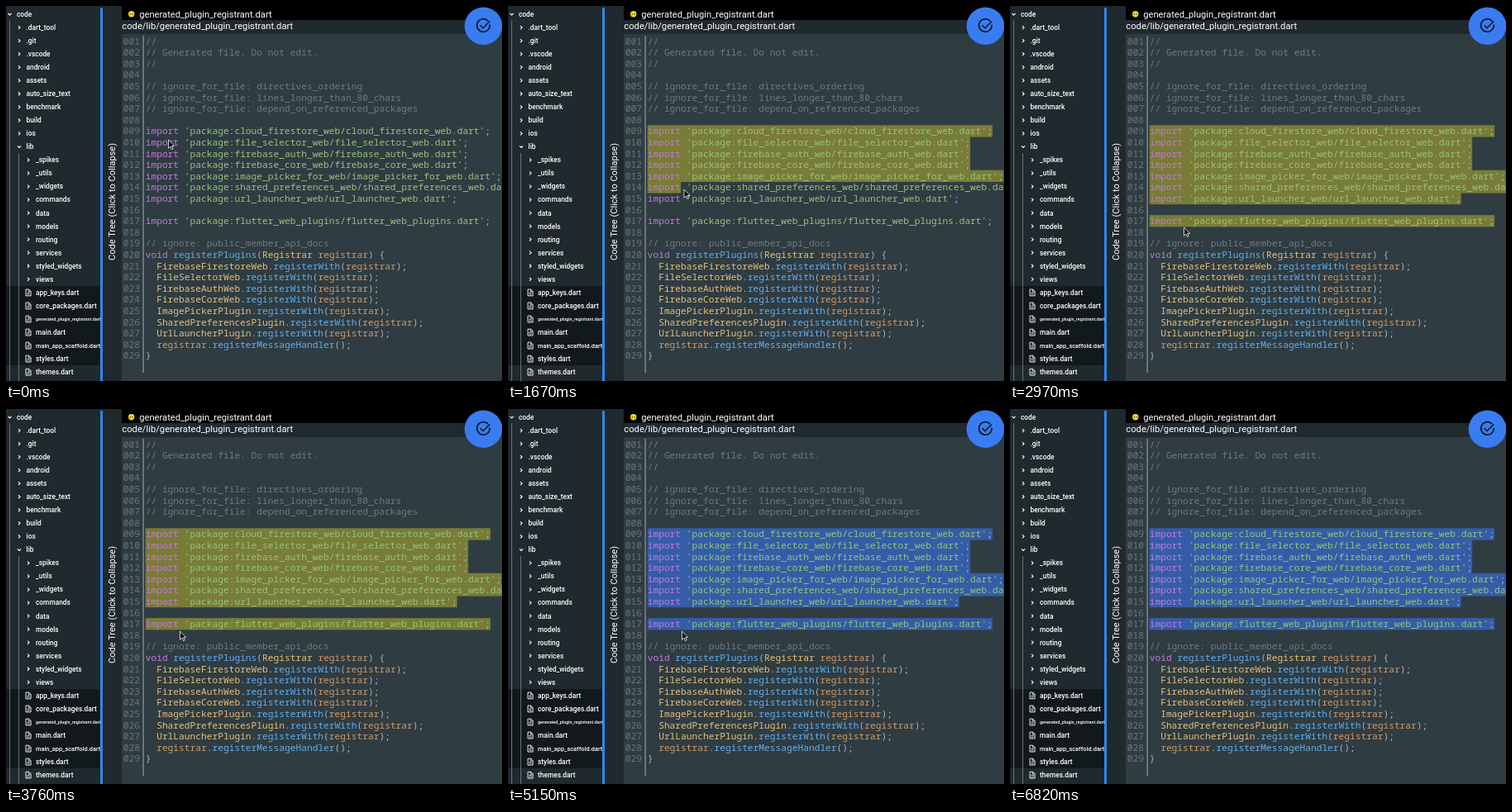
Write an HTML page that moves like this. It is 600 px wide and 454 px high and loops after 6.85 s.

```html
<!DOCTYPE html>
<html>
<head>
<meta charset="utf-8">
<style>
html, body { margin: 0; width: 100%; height: 100%; overflow: hidden; background: #000; }
svg { display: block; }
text { white-space: pre; font-family: Roboto, sans-serif; fill: #fff; }
.mono { font: 11.22px "Noto Sans Mono", "DejaVu Sans Mono", monospace; }
</style>
</head>
<body>
<svg id="stage" width="600" height="454" viewBox="0 0 600 454"></svg>
<script>
const stage = document.getElementById('stage');
const LOOP = 6850, LAG = 80, DRAG_START = 850, RECOLOR = 4000, CURSOR_END = 6000;
const CODE_X = 168.7, CODE_Y = 35.8, CHAR = 6.732, LINE = 13.6, FIRST = 8, LAST = 16;
const PANEL = '#20292e';

function add(tag, attrs, content, parent = stage) {
  const el = document.createElementNS('http://www.w3.org/2000/svg', tag);
  for (const key in attrs) el.setAttribute(key, attrs[key]);
  if (content) el.textContent = content;
  return parent.appendChild(el);
}
const rect = (x, y, width, height, fill) => add('rect', { x, y, width, height, fill });
const label = (x, y, size, content, extra) =>
  add('text', { x, y, 'font-size': size, ...extra }, content);
const path = (d, stroke, width, fill = 'none') =>
  add('path', { d, stroke, 'stroke-width': width, fill });

// Panels
rect(0, 0, 140, 454, PANEL);
rect(0, 339, 114, 96, '#12191d');
rect(114, 2, 3, 452, '#2f86ee');
rect(140, 17, 460, 17, PANEL);
rect(140, 34, 460, 420, '#2f3c42');
rect(165.5, 36, 1.2, 408, '#8d9ba1');

// File tree
const folders = ['.dart_tool', '.git', '.vscode', 'android', 'assets', 'auto_size_text',
  'benchmark', 'build', 'ios', 'lib'];
const subfolders = ['_spikes', '_utils', '_widgets', 'commands', 'data', 'models', 'routing',
  'services', 'styled_widgets', 'views'];
const files = ['app_keys', 'core_packages', 'generated_plugin_registrant', 'main',
  'main_app_scaffold', 'styles', 'themes'];
const smallSizes = { generated_plugin_registrant: 5.4, main_app_scaffold: 7.4 };
let row = 0;

function treeRow(x, name, size = 8.35) {
  const y = 10 + 16.04 * row++;
  label(x, y + size * 0.35, size, name, { 'font-weight': 500 });
  return y;
}
function chevron(x, y, open) {
  path(open ? `M${x - 2} ${y - 1}l2 2l2 -2` : `M${x - 1} ${y - 2}l2 2l-2 2`, '#fff', 1.1);
}
path('M4.5 17V454M15.5 178V454', '#7d878c', 0.8);
chevron(4.5, treeRow(13, 'code'), true);
for (const name of folders) chevron(16, treeRow(24.5, name), name === 'lib');
for (const name of subfolders) chevron(27, treeRow(36, name), false);
for (const name of files) {
  const y = treeRow(36, name + '.dart', smallSizes[name]);
  path(`M24 ${y - 3.8}h3.7l2.4 2.4v5.4h-6.1z`, '#fff', 0.9);
  path(`M25.4 ${y + 0.3}h3.3M25.4 ${y + 2.1}h3.3M27.4 ${y - 3.6}v2.5h2.5`, '#fff', 0.8);
}

// Collapse bar and header
label(0, 0, 11.07, 'Code Tree (Click to Collapse)', { transform: 'translate(132 308) rotate(-90)' });
add('circle', { cx: 151.7, cy: 9.7, r: 3.7, fill: '#f5dc1e' });
path('M149.6 9.8h1.3M152.4 9.8h1.3', '#3b3500', 1.2);
label(161.3, 13.7, 11.15, 'generated_plugin_registrant.dart');
label(140.3, 28, 11.22, 'code/lib/generated_plugin_registrant.dart');

// Source text
const imports = ['cloud_firestore', 'file_selector', 'firebase_auth', 'firebase_core',
  'image_picker_for', 'shared_preferences', 'url_launcher']
  .map(name => `import 'package:${name}_web/${name}_web.dart';`);
const calls = ['FirebaseFirestoreWeb', 'FileSelectorWeb', 'FirebaseAuthWeb', 'FirebaseCoreWeb',
  'ImagePickerPlugin', 'SharedPreferencesPlugin', 'UrlLauncherPlugin']
  .map(name => `  ${name}.registerWith(registrar);`);
const lines = ['//', '// Generated file. Do not edit.', '//', '',
  '// ignore_for_file: directives_ordering',
  '// ignore_for_file: lines_longer_than_80_chars',
  '// ignore_for_file: depend_on_referenced_packages', '',
  ...imports, '',
  "import 'package:flutter_web_plugins/flutter_web_plugins.dart';", '',
  '// ignore: public_member_api_docs',
  'void registerPlugins(Registrar registrar) {',
  ...calls, '  registrar.registerMessageHandler();', '}'];
const rules = [
  [/^\/\//, '#6e7a81'], [/^'/, '#98c379'], [/^(import|void)$/, '#c678dd'],
  [/^[A-Z]/, '#e6c07b'], [/^register/, '#61aeee'], [/^registrar$/, '#d19a66'], [/./, '#abb2bf']];
const colorOf = token => rules.find(([pattern]) => pattern.test(token))[1];

const marks = [];
for (let i = FIRST; i <= LAST; i++) {
  marks[i] = rect(CODE_X, CODE_Y + i * LINE - 0.3, 0, 14.3, '#7d8037');
  marks[i].setAttribute('fill-opacity', 0.95);
}
lines.forEach((line, i) => {
  const y = CODE_Y + i * LINE + 10.8;
  add('text', { x: 141.7, y, class: 'mono', style: 'fill:#6a767d' }, String(i + 1).padStart(3, '0'));
  const text = add('text', { x: CODE_X, y, class: 'mono' });
  for (const token of line.match(/\/\/.*|'[^']*'|\w+|\s+|[^\w\s]/g) || [])
    add('tspan', { style: 'fill:' + colorOf(token) }, token, text);
});

// Floating button
add('circle', { cx: 577.5, cy: 24.2, r: 22.8, fill: '#397cf1' });
path('M583.2 18.2A7.8 7.8 0 1 0 585.2 22.6M573.6 23.3l3.4 3.4l8.2 -8.2', '#10151c', 1.6);

const cursor = path('M0 0V10.2L2.4 8L4 11.6L5.6 10.9L4 7.4H7.2Z', '#fff', 0.8, '#000');

// Pointer path: time, x, y
const track = [[0, 196.5, 162], [250, 196.5, 162], [600, 169, 150], [DRAG_START, 169, 152],
  [1060, 197, 168], [1670, 213, 222], [2120, 214, 251], [2650, 211, 264],
  [2860, 210.5, 268], [3300, 210.5, 268], [3700, 210.5, 269], [LOOP, 210.5, 269]];

function pointerAt(t) {
  const k = Math.max(1, track.findIndex(p => p[0] >= t));
  const [t0, x0, y0] = track[k - 1], [t1, x1, y1] = track[k];
  const f = Math.max(0, (t - t0) / (t1 - t0));
  return [x0 + (x1 - x0) * f, y0 + (y1 - y0) * f];
}

function draw(t) {
  const [x, y] = pointerAt(t);
  cursor.setAttribute('transform', `translate(${x} ${y})`);
  cursor.setAttribute('visibility', t < CURSOR_END ? 'visible' : 'hidden');

  // The selection trails the pointer a little
  const [selX, selY] = pointerAt(t - LAG);
  const selRow = Math.floor((selY - CODE_Y) / LINE);
  const selCol = Math.max(0, Math.floor((selX - CODE_X) / CHAR));
  for (let i = FIRST; i <= LAST; i++) {
    const full = lines[i].length;
    const count = t - LAG < DRAG_START || i > selRow ? 0
      : i < selRow ? full : Math.min(full, selCol);
    marks[i].setAttribute('width', count * CHAR);
    marks[i].setAttribute('fill', t < RECOLOR ? '#7d8037' : '#355fae');
  }
}

const start = performance.now();
function frame() {
  draw((performance.now() - start) % LOOP);
  requestAnimationFrame(frame);
}
frame();
</script>
</body>
</html>
```
